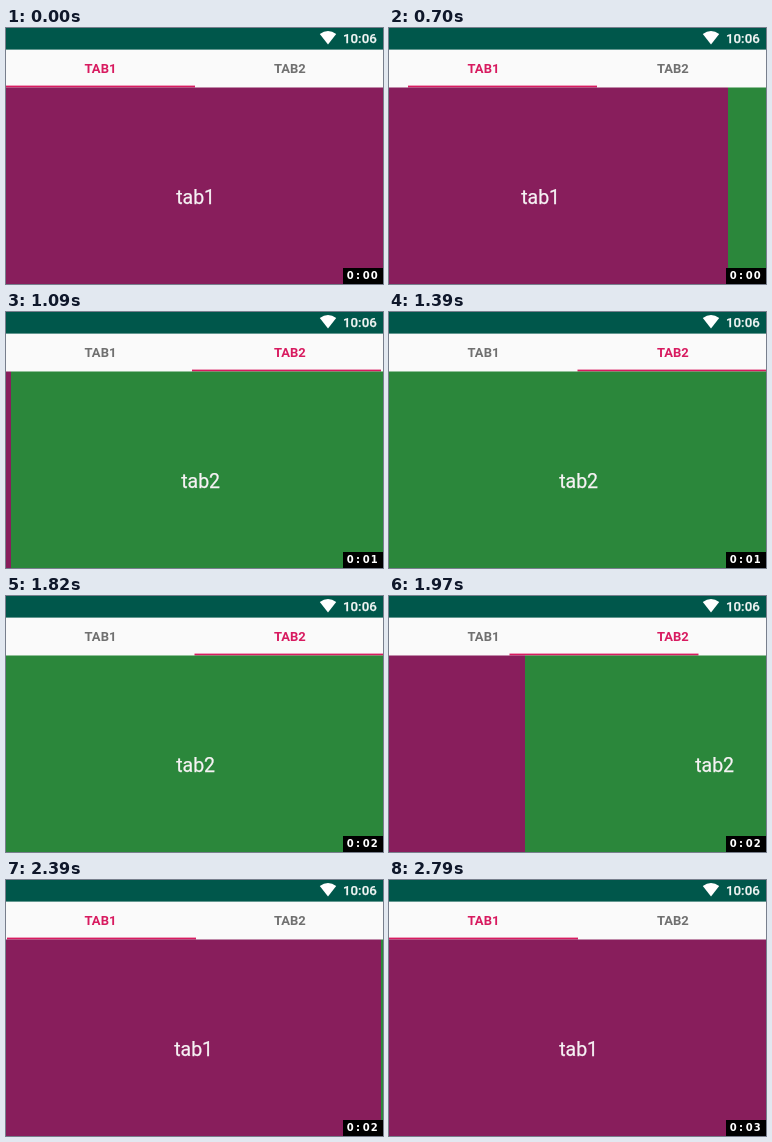
Write an HTML page that moves like this. It is 377x256 px and loops after 2890 ms.

```html
<!DOCTYPE html>
<html lang="en">
<head>
<meta charset="utf-8">
<title>Swiping between tabs</title>
<style>
  html, body { margin: 0; width: 100%; height: 100%; overflow: hidden; }
  svg { display: block; width: 100%; height: 100%; font-family: Roboto, sans-serif; }
  .clock { font-size: 13.3px; font-weight: 500; fill: #f2f6f5; stroke: #f2f6f5; stroke-width: .25px; }
  .tab { font-size: 13px; font-weight: 700; fill: #707070; }
  .tab.active { fill: #d81b60; }
  .label { font-size: 19.5px; fill: #f6f2f4; stroke: #f6f2f4; stroke-width: .25px; }
  .timer { font: 700 10px "DejaVu Sans", sans-serif; fill: #fff; }
</style>
</head>
<body>
<svg viewBox="0 0 377 256">
  <rect width="377" height="60" fill="#fafafa"/>
  <rect width="377" height="21.6" fill="#00574b"/>
  <path d="M313.8 6Q322 .2 330.2 6L322 16.6Z" fill="#fff"/>
  <text class="clock" x="337" y="15.3">10:06</text>

  <text class="tab" id="tab1" x="78.6" y="45.1">TAB1</text>
  <text class="tab" id="tab2" x="268" y="45.1">TAB2</text>
  <rect id="indicator" y="57.6" width="189" height="1.9" fill="#d81b60"/>

  <g id="page1">
    <rect y="59.5" width="377" height="197" fill="#881e5c"/>
    <text class="label" x="170.2" y="176">tab1</text>
  </g>
  <g id="page2">
    <rect y="59.5" width="377" height="197" fill="#2b873b"/>
    <text class="label" x="170.2" y="176">tab2</text>
  </g>

  <rect x="337" y="240" width="40" height="16"/>
  <text class="timer" id="timer" x="340.7 350 356.7 364.7" y="251">0:00</text>
</svg>
<script>
  const LOOP = 2890;
  const WIDTH = 377;
  const RELEASE_GAP = 339;
  const SETTLE = 958;

  // The picture holds still between these times, in ms.
  const swipes = [
    { release: 700, forward: true, holds: [700, 850, 970, 1090, 1240, 1390] },
    { release: 1930, forward: false, holds: [1970, 2090, 2240, 2390, 2510] }
  ];

  const [tab1, tab2, page1, page2, indicator, timer] =
    ["tab1", "tab2", "page1", "page2", "indicator", "timer"]
      .map(id => document.getElementById(id));

  const moveTo = (el, x) => el.setAttribute("transform", `translate(${x})`);

  // Distance left to travel, easing out after the finger lifts.
  const gapAfter = elapsed =>
    Math.round(RELEASE_GAP * Math.max(0, 1 - elapsed / SETTLE) ** 8);

  // Left edge of the second page.
  function pageEdge(time) {
    const swipe = swipes.findLast(({ holds }) => holds[0] <= time);
    if (!swipe) return WIDTH;
    const held = swipe.holds.findLast(start => start <= time);
    const gap = gapAfter(held - swipe.release);
    return swipe.forward ? gap : WIDTH - gap;
  }

  function render(time) {
    const edge = pageEdge(time);
    moveTo(page1, edge - WIDTH);
    moveTo(page2, edge);
    moveTo(indicator, (WIDTH - edge) / 2);

    const firstActive = edge > WIDTH / 2;
    tab1.classList.toggle("active", firstActive);
    tab2.classList.toggle("active", !firstActive);

    timer.textContent = "0:0" + Math.floor((time + 120) / 970);
  }

  const origin = performance.now();
  function tick() {
    render((performance.now() - origin) % LOOP);
    requestAnimationFrame(tick);
  }
  tick();
</script>
</body>
</html>
```
